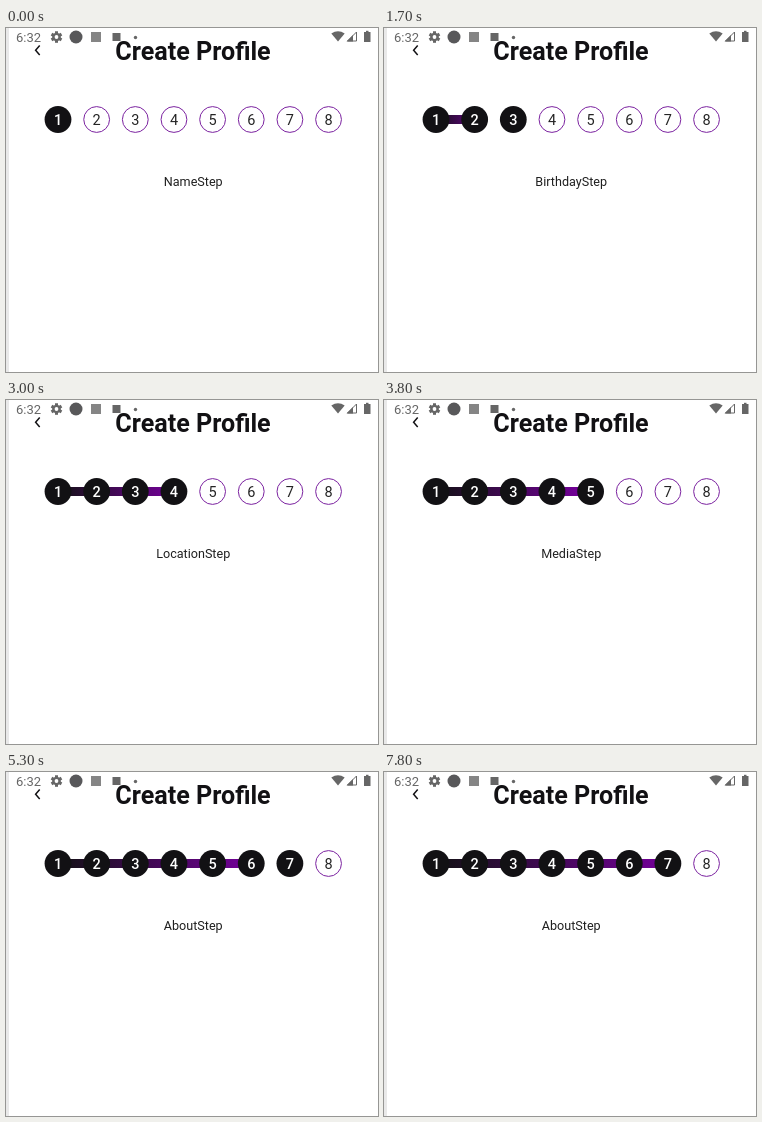
These frames come from a looping animation (372 by 344 pixels, 8000 ms). An HTML page with a canvas:

```html
<!DOCTYPE html>
<html lang="en">
<head>
<meta charset="utf-8">
<title>Create Profile</title>
<style>
  html, body { margin: 0; width: 100%; height: 100%; overflow: hidden; background: #fff; }
  canvas { display: block; }
</style>
</head>
<body>
<canvas id="stage" width="372" height="344"></canvas>
<script>
const ctx = document.getElementById('stage').getContext('2d');
const LOOP = 8000, TICK = 100, GROW = 300;
const INK = '#121114', GREY = '#666', PURPLE = '#74009a';
const ROW_Y = 91.5, RADIUS = 13.4, COUNT = 8;

const changes = [
  { at: 0, step: 1, label: 'NameStep' },
  { at: 100, step: 2, label: 'AboutStep' },
  { at: 1600, step: 3, label: 'BirthdayStep' },
  { at: 2500, step: 4, label: 'LocationStep' },
  { at: 3600, step: 5, label: 'MediaStep' },
  { at: 4400, step: 6, label: 'NameStep' },
  { at: 5300, step: 7, label: 'AboutStep' },
  { at: 6000, step: 8, label: 'complete-step' },
  { at: 7500, step: 7, label: 'AboutStep' }
];

const stepX = n => 52 + (n - 1) * 38.65;
const easeInOut = p => p < 0.5 ? 2 * p * p : 1 - 2 * (1 - p) ** 2;

function text(str, x, y, size, color, weight = 400, align = 'center') {
  ctx.font = `${weight} ${size}px Roboto, sans-serif`;
  ctx.textAlign = align;
  ctx.fillStyle = color;
  ctx.fillText(str, x, y);
}

function disc(x, y, r, color) {
  ctx.beginPath();
  ctx.arc(x, y, r, 0, Math.PI * 2);
  ctx.fillStyle = color;
  ctx.fill();
}

function rect(x, y, w, h, color) {
  ctx.fillStyle = color;
  ctx.fillRect(x, y, w, h);
}

function path(points, close) {
  ctx.beginPath();
  points.forEach(([x, y]) => ctx.lineTo(x, y));
  if (close) ctx.closePath();
}

function gear(x, y) {
  ctx.save();
  ctx.translate(x, y);
  for (let i = 0; i < 6; i++) {
    ctx.rotate(Math.PI / 3);
    rect(-1.5, -5.8, 3, 3, GREY);
  }
  ctx.restore();
  disc(x, y, 4.3, GREY);
  disc(x, y, 1.9, '#fff');
}

function statusBar() {
  text('6:32', 10, 13.5, 13, GREY, 400, 'left');
  gear(50.5, 9);
  disc(70, 9, 6.5, '#58585a');
  rect(85, 4, 10, 10, '#858585');
  rect(106.5, 5, 8, 8, GREY);
  disc(129.5, 9.5, 1.7, GREY);

  // Wi-Fi, mobile signal, battery
  ctx.fillStyle = GREY;
  ctx.beginPath();
  ctx.moveTo(332, 13.5);
  ctx.lineTo(325.3, 5.5);
  ctx.quadraticCurveTo(332, 0.8, 338.7, 5.5);
  ctx.fill();
  path([[340.5, 13.5], [347, 7], [347, 13.5]], true);
  ctx.fill();
  path([[341.5, 13], [350.5, 4], [350.5, 13]], true);
  ctx.strokeStyle = GREY;
  ctx.lineWidth = 1;
  ctx.stroke();
  rect(358, 4, 6.5, 10, GREY);
  rect(360, 2.8, 2.5, 2, GREY);
}

function header() {
  path([[33.7, 17.5], [29.6, 22.2], [33.7, 27]]);
  ctx.strokeStyle = INK;
  ctx.lineWidth = 1.5;
  ctx.stroke();
  text('Create Profile', 187, 32, 25.1, INK, 700);
}

function progressBar(position) {
  if (position <= 1) return;
  const start = stepX(1), end = stepX(position);
  const fill = ctx.createLinearGradient(start, 0, end, 0);
  fill.addColorStop(0, INK);
  fill.addColorStop(1, PURPLE);
  rect(start, 87, end - start, 9, fill);
}

function stepCircle(n, active) {
  const x = stepX(n);
  disc(x, ROW_Y, RADIUS, active ? INK : '#fff');
  if (!active) {
    ctx.beginPath();
    ctx.arc(x, ROW_Y, RADIUS - 0.5, 0, Math.PI * 2);
    ctx.strokeStyle = '#7b22a0';
    ctx.lineWidth = 1;
    ctx.stroke();
  }
  text(n, x, 97, 14.5, active ? '#fff' : '#242424', active ? 500 : 400);
}

function draw(time) {
  const index = changes.findLastIndex(c => c.at <= time);
  const current = changes[index];
  const from = changes[Math.max(0, index - 1)].step;
  const p = easeInOut(Math.min(1, (time - current.at) / GROW));

  rect(0, 0, 372, 344, '#fff');
  rect(0, 0, 3, 344, '#e9e9e9');
  statusBar();
  header();
  progressBar(from + (current.step - from) * p);
  for (let n = 1; n <= COUNT; n++) stepCircle(n, n <= current.step);
  text(current.label, 187.2, 158, 12.6, '#202020');
}

const origin = performance.now();
function frame() {
  const time = (performance.now() - origin) % LOOP;
  draw(Math.floor(time / TICK) * TICK);
  requestAnimationFrame(frame);
}
frame();
</script>
</body>
</html>
```
